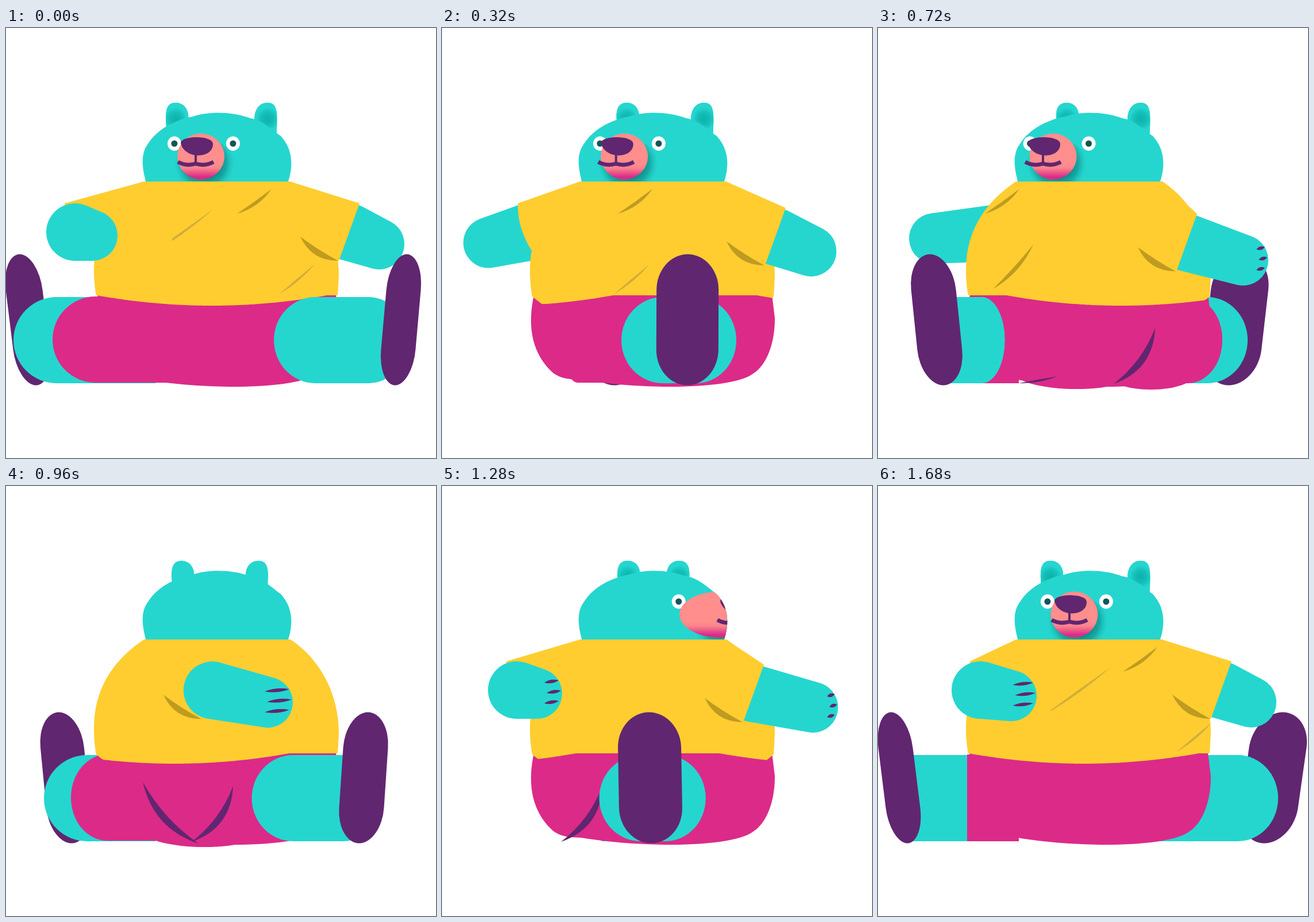
Recreate the animation shown at these times as an HTML page with a canvas. Size 748 by 748 pixels, loop 1760 ms.

```html
<!DOCTYPE html>
<html lang="en">
<head>
<meta charset="utf-8">
<title>Spinning bear</title>
<style>
html, body { margin: 0; width: 100%; height: 100%; overflow: hidden; background: #fff; }
canvas { display: block; width: 100vw; height: 100vh; }
</style>
</head>
<body>
<canvas id="stage" width="748" height="748"></canvas>
<script>
const ctx = document.getElementById('stage').getContext('2d');
const STEP = 80, STEPS = 22, HALF = 11; // the legs repeat after half a turn
const MID = 367;
const TEAL = '#25d6cf', YELLOW = '#ffcd30', PINK = '#dc2a88', PURPLE = '#612670';
const OCHRE = '#bf9b20', SAND = '#d1ac3c';

// Key poses [step, ...values]; x values are offsets from the body's middle.
const yaw = [[0, -35], [2, -56], [9, -78], [12, -190], [15, 190], [18, 55], [21, -32], [22, -35]];
const leftEar = [[0, -72], [2, -71], [5, -33], [9, -39], [14, -77], [18, -11], [21, -67], [22, -72]];
const rightEar = [[0, 88], [9, 90], [14, 60], [18, 31], [21, 90], [22, 88]];
const rightArm = [ // shoulder x, hand x, hand y
  [0, 230, 282, 376], [2, 230, 278, 382], [9, 170, 268, 404], [14, -127, -32, 358],
  [16, -237, -202, 361], [18, -67, -107, 360], [21, 230, 282, 376], [22, 230, 282, 376]];
const leftArm = [
  [0, -247, -217, 361], [2, -225, -289, 375], [6, -209, -283, 372], [9, -145, -269, 366],
  [14, 153, 183, 340], [16, 175, 278, 385], [18, 41, 228, 352], [21, -189, -135, 365],
  [22, -247, -217, 361]];

// Creases drift left across the cloth from the step they appear.
const creases = [
  { color: SAND, width: 4, born: 21, x: 288, y: 399, dx: 117, dy: -84, speed: 44 },
  { color: SAND, width: 4, born: 21, x: 519, y: 463, dx: 62, dy: -52, speed: 44 },
  { color: OCHRE, width: 6, born: 20, x: 450, y: 323, dx: 60, dy: -43, speed: 24 },
  { color: OCHRE, width: 7, born: 5, x: 400, y: 454, dx: 70, dy: -77, speed: 50 },
  { color: PURPLE, width: 12, born: 5, x: 526, y: 619, dx: 72, dy: -97, speed: 29 },
  { color: PURPLE, width: 12, born: 12, x: 335, y: 622, dx: -97, dy: -107, speed: 30 },
  { color: PURPLE, width: 4, born: 5, x: 421, y: 618, dx: 67, dy: -12, speed: 44 }];

const head = new Path2D('M244 270C236 240 234 218 248 200C262 178 292 160 325 154' +
  'C352 145 392 145 425 157C446 160 464 178 478 188C498 210 501 238 490 270Z');
const pants = new Path2D('M160 464C150 510 152 560 190 597C206 612 226 611 244 612' +
  'C290 620 350 624 395 624C460 624 520 617 540 602C558 592 579 560 579 505L574 464Z');

function sample(track, n) {
  const i = track.findIndex(key => key[0] > n);
  const a = track[i - 1], b = track[i];
  const k = (n - a[0]) / (b[0] - a[0]);
  return a.slice(1).map((v, j) => v + (b[j + 1] - v) * k);
}

function fill(color, draw) {
  ctx.fillStyle = color;
  ctx.beginPath();
  draw();
  ctx.fill();
}
const ellipse = (color, x, y, rx, ry = rx) =>
  fill(color, () => ctx.ellipse(x, y, rx, ry, 0, 0, 7));

function slab(color, x0, x1, rl, rr, top = 468, bottom = 618, ry = 75) {
  const l = { x: rl, y: ry }, r = { x: rr, y: ry };
  fill(color, () => ctx.roundRect(x0, top, x1 - x0, bottom - top, [l, r, r, l]));
}

function foot(x, halfWidth, lean) {
  ctx.save();
  ctx.transform(1, 0, -lean / 113, 1, x, 507.5);
  slab(PURPLE, -halfWidth, halfWidth, halfWidth, halfWidth, -114, 114, 62);
  ctx.restore();
}

// A curved stroke, pointed at both ends.
function crease(color, width, x0, y0, dx, dy, bow = 0) {
  const d = Math.hypot(dx, dy), nx = -dy / d, ny = dx / d;
  const bend = (b, x, y) =>
    ctx.quadraticCurveTo(x0 + dx / 2 + nx * b, y0 + dy / 2 + ny * b, x, y);
  fill(color, () => {
    ctx.moveTo(x0, y0);
    bend(2 * bow - width, x0 + dx, y0 + dy);
    bend(2 * bow + width, x0, y0);
  });
}

function drawCreases(n) {
  for (const { color, width, born, x, y, dx, dy, speed } of creases) {
    const left = x - speed * ((n - born + STEPS) % STEPS);
    if (Math.min(left, left + dx) > 165)
      crease(color, width, left, y, dx, dy, Math.sign(dx) * width * width / 10);
  }
}

function arm(track, n, behind) {
  const [shoulder, hand, hy] = sample(track, n);
  const sy = 355 + Math.max(0, hy - 376) * 0.65;
  const inward = Math.abs(hand) < Math.abs(shoulder);
  const claws = !behind && n > 6 && (n < 20 || inward);
  return { sx: MID + shoulder, sy, hx: MID + hand, hy, shoulder, hand, inward, behind, claws };
}

function drawLimb({ sx, sy, hx, hy, hand, claws }) {
  const sr = 50, hr = 44;
  const d = Math.hypot(hx - sx, hy - sy), dir = Math.atan2(hy - sy, hx - sx);
  const a = Math.acos(Math.min(1, (sr - hr) / d));
  fill(TEAL, () => {
    ctx.arc(sx, sy, sr, dir + a, dir - a + 2 * Math.PI);
    ctx.arc(hx, hy, hr, dir - a, dir + a);
  });
  if (!claws) return;
  const length = 12 + 45 * (1 - Math.abs(hand) / 285);
  for (const row of [-1, 0, 1])
    crease(PURPLE, 6, hx + 42 - 4 * row * row - length, hy - 1 + 18 * row, length, -4);
}

function drawSleeve({ sx, sy, shoulder }) {
  const side = Math.sign(shoulder);
  if (Math.abs(shoulder) < 155) return;
  fill(YELLOW, () => {
    ctx.moveTo(MID + side * 127, 267);
    ctx.lineTo(sx + side * 18, sy - 50);
    ctx.quadraticCurveTo(sx + (side < 0 ? -20 : 0), sy, sx - side * 18, sy + 50);
    ctx.lineTo(MID + side * 65, 395);
  });
}

function drawArm(a) {
  const outward = !a.inward && Math.abs(a.shoulder) > 155;
  if (!a.behind && outward) drawLimb(a);
  drawSleeve(a);
  if (!a.behind && a.shoulder > -140) crease(OCHRE, 11, a.sx - 85, a.sy + 8, 66, 42, 7);
  if (!a.behind && !outward) drawLimb(a);
}

function drawEar(offset, shaded) {
  const x = MID + offset, top = 130;
  const headTop = px => 233 - 81 * Math.sqrt(1 - ((px - MID) / 129) ** 2);
  const base = x - offset * 0.04, l = base - 19, r = base + 19;
  const shape = () => {
    ctx.moveTo(l, headTop(l));
    ctx.bezierCurveTo(l - 2, top + 18, x - 18, top, x, top);
    ctx.bezierCurveTo(x + 18, top, r + 2, top + 18, r, headTop(r));
  };
  fill(TEAL, shape);
  if (!shaded) return;
  const g = ctx.createRadialGradient(x, top + 28, 2, x, top + 28, 20);
  g.addColorStop(0, '#0fb3ad');
  g.addColorStop(0.5, '#14bfb8');
  g.addColorStop(1, TEAL);
  fill(g, shape);
}

// The nearer a feature is to the tip of the nose, the further it turns.
function drawFace(turn) {
  const snout = MID + turn * 0.8, nose = MID + turn, eyes = MID + turn * 0.66;
  const mouth = nose - 2;
  ctx.save();
  ctx.clip(head);
  const shade = ctx.createRadialGradient(snout + 6, 235, 28, snout + 6, 235, 55);
  shade.addColorStop(0, '#0e8f8d');
  shade.addColorStop(0.4, '#149f9bcc');
  shade.addColorStop(1, '#25d6cf00');
  ellipse(shade, snout + 6, 240, 55, 46);
  for (const x of [eyes - 51, eyes + 51]) {
    ellipse('#fff', x, 201, 12, 12.5);
    ellipse('#12565a', x, 201, 5.5);
  }
  const skin = ctx.createLinearGradient(0, 236, 0, 263);
  skin.addColorStop(0, '#ff8e8c');
  skin.addColorStop(0.3, '#f9828c');
  skin.addColorStop(0.85, PINK);
  ellipse(skin, snout, 223.5, 41 + Math.max(0, turn) * 0.2, 40);
  fill(PURPLE, () => {
    ctx.moveTo(nose - 28, 200);
    ctx.bezierCurveTo(nose - 28, 187, nose + 28, 186, nose + 28, 202);
    ctx.bezierCurveTo(nose + 28, 228, nose - 22, 229, nose - 28, 200);
  });
  ctx.strokeStyle = PURPLE;
  ctx.lineWidth = 4;
  ctx.beginPath();
  ctx.moveTo(mouth, 218);
  ctx.lineTo(mouth, 238);
  ctx.stroke();
  ctx.lineWidth = 7;
  ctx.beginPath();
  ctx.moveTo(mouth - 31, 233);
  ctx.quadraticCurveTo(mouth - 16, 241, mouth, 236);
  ctx.quadraticCurveTo(mouth + 16, 241, mouth + 31, 233);
  ctx.stroke();
  ctx.restore();
}

function drawHead(n) {
  const facing = n < 12 || n > 15;
  for (const ear of [leftEar, rightEar]) drawEar(sample(ear, n)[0], facing);
  ctx.fillStyle = TEAL;
  ctx.fill(head);
  if (facing) drawFace(sample(yaw, n)[0]);
}

function drawBackLeg(p) {
  foot(38 + 65 * p, Math.min(50, 32 + 6 * p), 3 * p - 14);
  const left = 13 + 53 * p, right = left + 153;
  if (p < 5) {
    slab(TEAL, left, Math.max(260, right), 75, 0);
    slab(PINK, 81 + 32 * p, 300, 75 - 12 * p, 0, 467, 617);
  } else {
    slab(TEAL, Math.min(480, left), right, 0, 70);
    if (p === 9) slab(PINK, 400, 599, 0, 60, 467);
  }
}

const legEnd = p => 700 - 42 * p - 1.25 * p * p;

function drawFrontLeg(p) {
  const x = 687 - 65 * p;
  slab(TEAL, Math.min(466 - 38.5 * p, x), legEnd(p), p < 8 ? 72 : 10, Math.min(70, (10 - p) * 40));
  foot(x, 55 - (p - 5) ** 2, 10 - 2.4 * p);
}

function drawPants(n, p) {
  ctx.fillStyle = PINK;
  ctx.fill(pants);
  if (p > 8) slab(PINK, Math.min(167, legEnd(p)), 245, 0, 0, 467);
  if (n > 7 && n < 16) ellipse(PINK, 345, 597, 110, 31);
  if (n > 7 && n < 12) ellipse(PINK, 475, 598, 80, 31);
}

function drawShirt(p) {
  const center = 358 - 65 * p;
  const sag = x => Math.max(0, ...[center, center + 650].map(c => 18 * (1 - ((x - c) / 200) ** 2)));
  fill(YELLOW, () => {
    ctx.moveTo(240, 267);
    ctx.lineTo(495, 267);
    ctx.bezierCurveTo(549, 303, 579, 365, 579, 430);
    for (let x = 577; x >= 157; x -= 3)
      ctx.lineTo(x, 465 + Math.min(sag(x), 2 + 0.8 * (x - 157), 2 + 0.8 * (577 - x)));
    ctx.bezierCurveTo(146, 400, 154, 325, 240, 267);
  });
}

function draw(n) {
  const p = n % HALF;
  const arms = [arm(rightArm, n, n > 16 && n < 21), arm(leftArm, n, n > 0 && n < 15)];
  ctx.fillStyle = '#fff';
  ctx.fillRect(0, 0, 748, 748);
  drawBackLeg(p);
  arms.filter(a => a.behind).forEach(drawLimb);
  drawHead(n);
  drawPants(n, p);
  drawShirt(p);
  drawCreases(n);
  arms.forEach(drawArm);
  drawFrontLeg(p);
}

function tick() {
  draw(Math.floor(performance.now() / STEP) % STEPS);
  requestAnimationFrame(tick);
}
tick();
</script>
</body>
</html>
```
